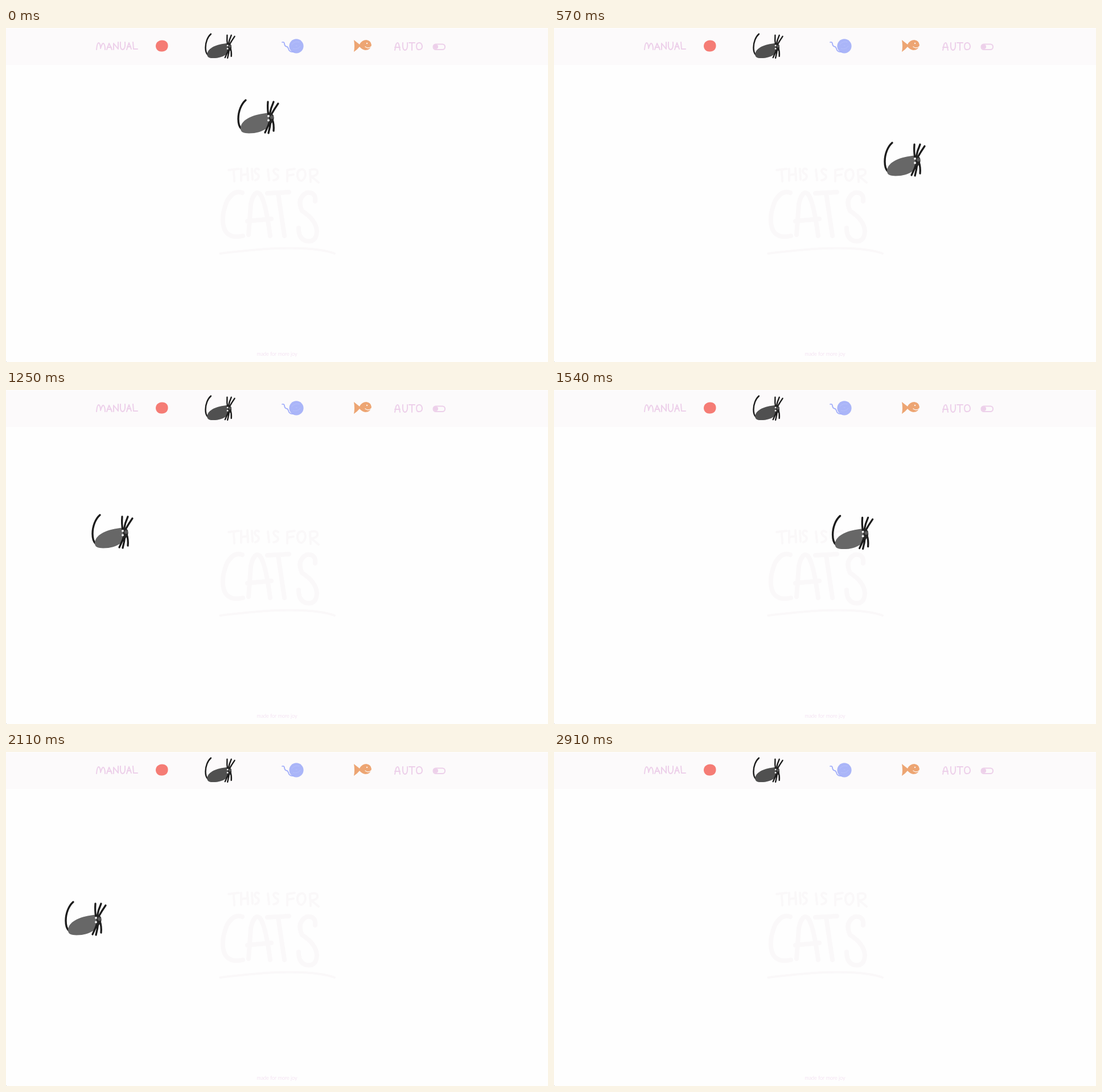
Recreate the animation shown at these times as an HTML page with a canvas. Size 952 by 588 pixels, loop 3.26 s.

```html
<!DOCTYPE html>
<html lang="en">
<head>
<meta charset="utf-8">
<title>Cat game</title>
<style>
  html, body { margin: 0; width: 100%; height: 100%; overflow: hidden; background: #fefefe; }
  canvas { display: block; }
</style>
</head>
<body>
<canvas id="stage" width="952" height="588"></canvas>
<script>
const ctx = document.getElementById('stage').getContext('2d');
const LOOP = 3260;
const FPS = 17.5;
const LAST_STEP = 50;
const PINK = '#edd0ea';
const FAINT = '#faf8f9';

// step, left, top of the toy as it is swept over the page
const KEYS = [
  [0, 406, 125], [2, 225, 180], [5, 350, 139], [8, 696, 165], [10, 579, 200],
  [14, 455, 417], [15, 410, 408], [17, 220, 340], [19, 220, 340],
  [22, 150, 218], [23, 133, 206], [24, 133, 206], [26, 350, 161],
  [29, 697, 407], [31, 707, 434], [34, 400, 175], [36, 103, 262], [38, 103, 262],
  [39, 113, 272], [41, 150, 250], [44, 352, 173], [46, 550, 115],
  [48, 721, 151], [49, 721, 151], [50, 826, 209]
];

function slope(i, axis) {
  if (i < 1 || i >= KEYS.length - 1) return 0;
  const [a, b, c] = [KEYS[i - 1], KEYS[i], KEYS[i + 1]];
  const before = (b[axis] - a[axis]) / (b[0] - a[0]);
  const after = (c[axis] - b[axis]) / (c[0] - b[0]);
  return before * after <= 0 ? 0 : 2 * before * after / (before + after);
}

// Monotone cubic between keys: turns and rests never overshoot
function track(step, axis) {
  let i = 0;
  while (i < KEYS.length - 2 && KEYS[i + 1][0] <= step) i++;
  const a = KEYS[i], b = KEYS[i + 1];
  const h = b[0] - a[0], u = (step - a[0]) / h, v = 1 - u;
  return a[axis] * v * v * (1 + 2 * u) + b[axis] * u * u * (3 - 2 * u)
    + h * u * v * (slope(i, axis) * v - slope(i + 1, axis) * u);
}

function line(d, color, width) {
  ctx.strokeStyle = color;
  ctx.lineWidth = width;
  ctx.stroke(new Path2D(d));
}

function fill(d, color) {
  ctx.fillStyle = color;
  ctx.fill(new Path2D(d));
}

function dot(x, y, r, color) {
  ctx.fillStyle = color;
  ctx.beginPath();
  ctx.arc(x, y, r, 0, 7);
  ctx.fill();
}

function mouse(x, y, scale, body) {
  ctx.save();
  ctx.translate(x, y);
  ctx.scale(scale, scale);
  line('M15 2C7 9 2 22 2 35C2 43 3 48 7 52', '#1c1c1c', 3.4);
  fill('M6 52C6 38 24 28 50 25C57 24 64 27 64 33C63 45 50 57 30 60C17 61 6 61 6 52Z', body);
  line('M55 29Q53 18 54 5M57 28Q59 16 64 5M59 29Q65 18 72 8', '#1c1c1c', 3.3);
  line('M58 38Q54 49 49 59M59 38Q58 49 55 60M62 36Q65 45 64 56', '#1c1c1c', 3.3);
  fill('M54 27Q60 23 64 29Q66 37 61 42L54 43Q58 35 54 27Z', '#262626');
  dot(61, 32, 3.2, '#575757');
  dot(55, 30, 2, '#f2f2f2');
  dot(55, 37.5, 2, '#f2f2f2');
  ctx.restore();
}

function header() {
  ctx.fillStyle = '#fcfafb';
  ctx.fillRect(0, 1, 952, 64);

  line('M159 38Q160 26 163 26Q166 28 166 36Q169 26 171 27Q174 29 174 38'
    + 'M177 38L181 27L186 38M178 34H185M189 38V27L197 37V25'
    + 'M201 25Q200 38 205 38Q210 37 209 25M212 38L216 26L220 37M213 33H219'
    + 'M223 25L224 37L231 37', PINK, 2);
  line('M683 39L685 29Q688 23 690 29L692 39M683 34H692'
    + 'M697 26Q696 39 701 39Q706 38 705 26M708 26H718M713 26V39'
    + 'M726 26Q721 26 721 32Q721 39 726 38Q731 38 731 32Q730 26 726 26', PINK, 2);

  ctx.beginPath();
  ctx.roundRect(750.5, 28.5, 20.5, 9.5, 4.5);
  ctx.stroke();
  dot(755, 33, 4, PINK);

  fill('M274 21.5C281 21.5 285 26 284.500 32C284 38 280 41.500 274 41.500C267 42 263 37 263 31.500C263.500 25 268 22 274 21.500Z', '#f57c75');
  mouse(349, 9, 0.73, '#505050');

  dot(510, 31.8, 12.6, '#aab5f8');
  line('M485 25Q489 24 489 28Q490 33 494 33Q496 35 497 39Q500 43 506 42', '#a3affa', 1.8);
  line('M502 29Q508 22 515 25M504 36Q512 39 517 32M509 31H511', '#b6c0fb', 1);

  fill('M611 21Q616 25 621 29Q625 21 633 21Q641 22 642 30Q640 39 631 39Q625 38 621 33Q617 38 611 42Q613 32 611 21Z', '#eda573');
  dot(634, 27, 1.2, '#fcf5f0');
  line('M631 33Q636 37 641 33', '#fcf5f0', 1.3);
}

function title() {
  line('M391 250L409 248M400 249L401 270M413 248V269M424 247L425 268M413 259L425 257'
    + 'M432 248L433 267M444 249Q438 245 437 252Q438 256 443 258Q446 265 438 268'
    + 'M460 249L462 268M478 250Q472 245 470 252Q472 257 477 259Q480 267 470 268'
    + 'M494 250V270M494 250L507 248M494 260L505 258'
    + 'M519 249Q511 250 512 261Q514 271 521 268Q528 262 525 252Q522 248 519 249'
    + 'M534 250L535 271M534 250Q549 246 547 256Q544 261 536 261L549 272', FAINT, 4);
  line('M415 290Q400 284 388 305Q376 335 384 355Q393 372 416 366'
    + 'M426 364L430 310Q436 284 446 292Q456 305 464 366M424 340L466 336'
    + 'M459 291L497 289M478 291L489 366'
    + 'M543 305Q545 288 528 290Q510 300 520 322Q545 338 546 358Q545 378 528 375Q514 372 514 352', FAINT, 8);
  line('M376 397Q470 385 520 388Q560 390 577 397', FAINT, 4);
}

function footer() {
  ctx.fillStyle = PINK;
  ctx.font = '300 9px Lato, sans-serif';
  ctx.textAlign = 'center';
  ctx.fillText('made for more joy', 476, 577);
  ctx.fillStyle = '#c8c8c8';
  ctx.fillRect(0, 587, 1, 1);
}

function draw(now) {
  const tick = Math.floor(now % LOOP / 10);
  const step = Math.ceil((tick + 0.8) * FPS / 100) - 1;
  ctx.fillStyle = '#fefefe';
  ctx.fillRect(0, 0, 952, 588);
  title();
  header();
  footer();
  if (step <= LAST_STEP) mouse(track(step, 1), track(step, 2), 1, '#676767');
}

ctx.lineCap = ctx.lineJoin = 'round';
const start = performance.now();
function loop() {
  draw(performance.now() - start);
  requestAnimationFrame(loop);
}
loop();
</script>
</body>
</html>
```
